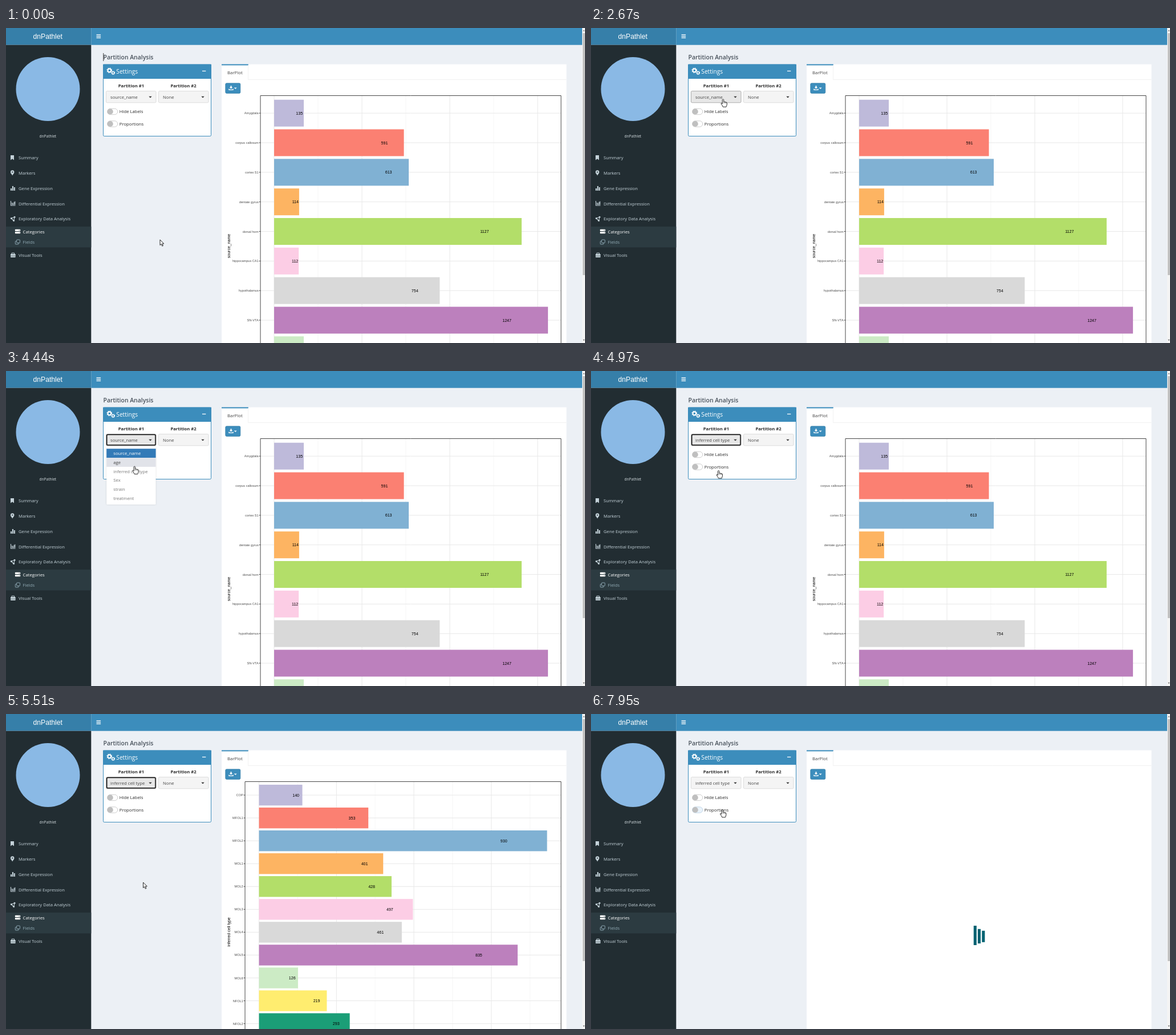
Recreate the animation shown at these times as an HTML page with a canvas. Size 1015 by 552 pixels, loop 8 s.

```html
<!DOCTYPE html>
<html lang="en">
<head>
<meta charset="utf-8">
<title>Partition Analysis</title>
<style>
html, body { margin: 0; width: 100%; height: 100%; overflow: hidden; background: #ecf0f5; }
canvas { display: block; width: 1015px; height: 552px; }
</style>
</head>
<body>
<canvas id="stage"></canvas>
<script>
const W = 1015, H = 552, LOOP = 8000;
const canvas = document.getElementById('stage');
const ctx = canvas.getContext('2d');
const dpr = window.devicePixelRatio || 1;
canvas.width = W * dpr;
canvas.height = H * dpr;

const UI = '"Open Sans", "Noto Sans", sans-serif';
const PLOT = '"Liberation Sans", Arial, sans-serif';
const BLUE = '#3c8dbc', NAV = '#c4d2d9', APP = 'dnPathlet';
const FILLS = ['#bebada', '#fb8072', '#80b1d3', '#fdb462', '#b3de69', '#fccde5',
  '#d9d9d9', '#bc80bd', '#ccebc5', '#ffed6f', '#1b9e77'];
const FIELDS = ['source_name', 'age', 'inferred cell type', 'Sex', 'strain', 'treatment'];

const regionChart = {
  title: 'source_name', left: 446, zero: 470, scale: 0.385, grid: 200,
  top: 149.2, step: 51.83, bar: 47,
  names: ['Amygdala', 'corpus callosum', 'cortex S1', 'dentate gyrus', 'dorsal horn',
    'hippocampus CA1', 'hypothalamus', 'SN-VTA', 'zona incerta'],
  values: [135, 591, 613, 114, 1127, 112, 754, 1247, 135]
};
const typeChart = {
  title: 'inferred cell type', left: 419, zero: 443.5, scale: 0.543, grid: 125,
  top: 142.1, step: 40.05, bar: 36.4,
  names: ['COP', 'MFOL1', 'MFOL2', 'MOL1', 'MOL2', 'MOL3', 'MOL4', 'MOL5', 'MOL6', 'NFOL1', 'NFOL2'],
  values: [140, 353, 930, 401, 428, 497, 461, 835, 126, 219, 293]
};

// Pointer stops: time, x, y
const STOPS = [[0, 270, 371], [1140, 270, 371], [1980, 238, 156], [2060, 237, 153],
  [2670, 231.5, 124.3], [3800, 231.5, 124.3], [4440, 225.3, 166.7], [4640, 223.6, 174],
  [5150, 223.6, 174], [5510, 240.5, 295], [5570, 241, 296], [6300, 241, 296],
  [6700, 256, 232], [7100, 230.8, 164], [7350, 230.8, 164], [7490, 230, 167]];

function rect(x, y, w, h, fill) {
  ctx.fillStyle = fill;
  ctx.fillRect(x, y, w, h);
}
function round(x, y, w, h, r, fill, stroke, width = 1) {
  ctx.beginPath();
  ctx.roundRect(x, y, w, h, r);
  if (fill) { ctx.fillStyle = fill; ctx.fill(); }
  if (stroke) { ctx.strokeStyle = stroke; ctx.lineWidth = width; ctx.stroke(); }
}
function disc(x, y, r, fill) {
  ctx.beginPath();
  ctx.arc(x, y, r, 0, 7);
  ctx.fillStyle = fill;
  ctx.fill();
}
function line(points, color, width = 1) {
  ctx.beginPath();
  points.forEach(([x, y]) => ctx.lineTo(x, y));
  ctx.strokeStyle = color;
  ctx.lineWidth = width;
  ctx.stroke();
}
function poly(points, fill) {
  ctx.beginPath();
  points.forEach(([x, y]) => ctx.lineTo(x, y));
  ctx.fillStyle = fill;
  ctx.fill();
}
function text(s, x, y, size, color, { align = 'left', weight = 400, font = UI } = {}) {
  ctx.font = `${weight} ${size}px ${font}`;
  ctx.textAlign = align;
  ctx.fillStyle = color;
  ctx.fillText(s, x, y);
}
function caretDown(x, y, color, r = 2.7) {
  poly([[x - r, y], [x + r, y], [x, y + r]], color);
}
function gear(x, y, r) {
  ctx.beginPath();
  ctx.arc(x, y, r, 0, 7);
  ctx.strokeStyle = '#fff';
  ctx.lineWidth = r * 0.65;
  ctx.stroke();
  ctx.beginPath();
  ctx.arc(x, y, r * 1.4, 0, Math.PI * 2);
  ctx.setLineDash([r * 0.55, r * 0.55]);
  ctx.stroke();
  ctx.setLineDash([]);
}

function drawHeader() {
  rect(149.3, 0, 860.7, 29.7, BLUE);
  rect(0, 0, 149.3, 29.7, '#367fa9');
  text(APP, 73.2, 18.7, 12.2, '#fff', { align: 'center', font: PLOT });
  for (let i = 0; i < 3; i++) rect(158.5, 11.2 + i * 2.7, 7.6, 1.3, '#fff');
}

function drawIcons() {
  poly([[8, 223], [14, 223], [14, 231.5], [11, 229.3], [8, 231.5]], NAV);
  disc(11.2, 252.5, 3.2, NAV);
  poly([[8.4, 254], [14, 254], [11.2, 258.6]], NAV);
  disc(11.2, 252.5, 1.1, '#222d32');
  [[8, 4], [10.9, 8], [13.8, 6]].forEach(([x, h]) => rect(x, 285 - h, 2.1, h, NAV));
  line([[8.5, 303], [8.5, 311], [16.5, 311]], NAV, 1.1);
  [4, 2.5, 5, 6].forEach((h, i) => rect(10 + i * 1.7, 309.8 - h, 1.2, h, NAV));
  line([[9.3, 333.5], [15, 331.3], [13.6, 338], [9.3, 333.5]], NAV, 1.1);
  [[9.3, 333.5], [15, 331.3], [13.6, 337.5]].forEach(([x, y]) => disc(x, y, 1.5, NAV));
  round(15.8, 352.8, 9.4, 3.3, 1, '#fff');
  round(15.8, 357, 9.4, 3.3, 1, '#fff');
  disc(23.2, 354.4, 0.6, '#2c3b41');
  disc(23.2, 358.6, 0.6, '#2c3b41');
  round(16.3, 373.5, 5.8, 5.5, 0.7, null, '#8aa4af');
  round(18.6, 371, 5.8, 5.5, 0.7, '#2c3b41', '#8aa4af');
  round(10, 394.3, 4.6, 3, 0.8, null, NAV, 1.1);
  round(8, 396, 8.7, 6, 0.9, NAV);
  rect(8, 399, 8.7, 0.6, '#222d32');
}

function drawSidebar() {
  rect(0, 29.7, 149.3, H, '#222d32');
  disc(73.5, 107, 56, '#8ab9e5');
  text(APP, 73.3, 192, 6.6, '#d5dde1', { align: 'center' });
  rect(0, 348, 149.3, 36.5, '#2c3b41');
  const items = [['Summary', 229.8], ['Markers', 256.7], ['Gene Expression', 283.6],
    ['Differential Expression', 310.5], ['Exploratory Data Analysis', 337.3], ['Visual Tools', 400.8]];
  items.forEach(([s, y]) => text(s, 22, y, 7.7, NAV));
  text('Categories', 29.6, 359.9, 7.7, '#fff');
  text('Fields', 29.6, 378.3, 7.7, '#93acb6');
  drawIcons();
}

function drawScrollbar() {
  rect(1010, 0, 5, H, '#f4f4f4');
  rect(1011, 9, 4, 424, '#c1c1c1');
  poly([[1011.3, 5.5], [1014.7, 5.5], [1013, 3.2]], '#777');
  poly([[1011.3, 545.8], [1014.7, 545.8], [1013, 548.2]], '#777');
}

function drawSelect(x, label, hover, focus) {
  const active = hover || focus;
  round(x, 110.5, 87.5, 20.3, 1.8, active ? '#e7e7e7' : '#f4f4f4', active ? '#adadad' : '#ddd');
  if (focus) round(x + 1.2, 111.6, 85.3, 18.2, 1.8, null, '#101010', 1.5);
  text(label, x + 7.5, 123.7, 7.7, '#444');
  caretDown(x + 77.5, 119.8, '#333');
}

function drawToggle(label, y, tint) {
  round(177.5, y - 5.2, 18.2, 10.4, 5.2, tint ? '#eaf3fb' : '#fff', tint ? '#bcd3e6' : '#c8c8c8', 0.9);
  disc(182.7, y, 5.1, '#bfbfbf');
  text(label, 198.8, y + 2.8, 7.7, '#2b2b2b');
}

function drawSettings(t) {
  text('Partition Analysis', 170.5, 55, 10.45, '#48515b', { weight: 600 });
  const caret = t < 560 || (t >= 1040 && t < 1560) || (t >= 2080 && t < 2610) || (t >= 3120 && t < 3320);
  if (caret) rect(170.4, 44, 0.9, 14, '#222');

  round(170.5, 64, 189, 125.5, 1.8, '#fff', BLUE);
  rect(170, 63.6, 190, 25.4, BLUE);
  gear(181.3, 74.3, 2.8);
  gear(187.8, 78.6, 2);
  text('Settings', 193.3, 80, 10.2, '#fff');
  rect(344, 74.8, 6.3, 1.3, '#fff');
  const head = { align: 'center', weight: 700 };
  text('Partition #1', 219.4, 104, 7.65, '#2b2b2b', head);
  text('Partition #2', 311, 104, 7.65, '#2b2b2b', head);

  const hover = t >= 2400 && t < 4970;
  const focus = t >= 3320 && t < 7800;
  drawSelect(175.5, t < 4970 ? FIELDS[0] : FIELDS[2], hover, focus);
  drawSelect(267.5, 'None', false, false);
  drawToggle('Hide Labels', 146.5, false);
  drawToggle('Proportions', 168, t >= 7950);
}

function drawMenu(pointerY) {
  ctx.save();
  ctx.shadowColor = 'rgba(0,0,0,.14)';
  ctx.shadowBlur = 3;
  round(176.2, 133, 86.4, 101, 1.5, '#fff');
  ctx.restore();
  const row = 15.85, top = 136.2;
  const over = Math.floor((pointerY - top) / row);
  FIELDS.forEach((s, i) => {
    const y = top + i * row;
    if (i === 0) rect(176.2, y, 86.4, row, '#337ab7');
    else if (i === over) rect(176.2, y, 86.4, row, '#e1e3e9');
    text(s, 188.3, y + 10.6, 7.7, i === 0 ? '#fff' : i === over ? '#444' : '#777');
  });
}

function drawTooltip() {
  round(232, 136.5, 57.5, 11.5, 0.5, '#fff', '#777', 0.7);
  text(FIELDS[0], 236.5, 144.8, 7.4, '#555');
}

function drawPlotBox() {
  rect(378, 63.6, 604.5, H, '#fff');
  rect(378, 63.4, 46.8, 2, BLUE);
  line([[424.5, 65.5], [424.5, 90.5], [982.5, 90.5]], '#f1f1f1');
  text('BarPlot', 388, 81, 7.8, '#444');
  round(384.8, 96.8, 26, 17.6, 1.8, BLUE, '#367fa9', 0.8);
  rect(393.5, 101.3, 2, 3, '#fff');
  poly([[391.7, 103.8], [397.3, 103.8], [394.5, 106.6]], '#fff');
  line([[391, 106.4], [391, 108.3], [398, 108.3], [398, 106.4]], '#fff', 1.3);
  caretDown(402.2, 104.6, '#fff', 2.5);
}

function drawChart(c) {
  const right = 973, top = 118.5;
  for (let i = 0, x; (x = c.zero + i * c.grid * c.scale) < right; i++)
    line([[x, top], [x, H]], i % 2 ? '#f3f3f3' : '#e8e8e8', i % 2 ? 0.7 : 1);
  c.names.forEach((name, i) => {
    const y = c.top + i * c.step, w = c.values[i] * c.scale;
    line([[c.left, y], [right, y]], '#e8e8e8');
    line([[c.left - 2.3, y], [c.left, y]], '#333', 0.9);
    rect(c.zero, y - c.bar / 2, w, c.bar, FILLS[i]);
    text(name, c.left - 3.3, y + 2, 5.6, '#4d4d4d', { align: 'right', font: PLOT });
    text(c.values[i], c.zero + w * 0.85, y + 2.6, 7.1, '#000', { align: 'center', font: PLOT });
  });
  line([[c.left, H], [c.left, top], [right, top], [right, H]], '#333', 0.9);
  ctx.save();
  ctx.translate(393, 382);
  ctx.rotate(-Math.PI / 2);
  text(c.title, 0, 0, 7, '#000', { align: 'center', font: PLOT });
  ctx.restore();
}

function drawSpinner() {
  [[670.8, 371, 34], [678, 376.8, 25.3], [685.3, 379.8, 20]]
    .forEach(([x, y, h]) => rect(x, y, 5.1, h, '#006272'));
}

function pointerAt(t) {
  let i = 0;
  while (i < STOPS.length - 1 && STOPS[i + 1][0] <= t) i++;
  const a = STOPS[i], b = STOPS[i + 1];
  if (!b) return [a[1], a[2]];
  const u = (t - a[0]) / (b[0] - a[0]);
  const k = u * u * (3 - 2 * u);
  return [a[1] + (b[1] - a[1]) * k, a[2] + (b[2] - a[2]) * k];
}

const ARROW = new Path2D('M0 0V9.6L2.2 7.6L3.8 11.2L5.4 10.5L3.8 7H6.8Z');
const HAND = new Path2D('M-1.2 1.2Q0-.6 1.2 1.2V5.2Q2.4 4.2 3.2 5.5Q4.4 4.7 5.2 6Q6.6 5.6 6.8 7V10' +
  'Q6.3 12 5.5 14H-.2Q-1 11.5-3.2 9Q-3.9 7.4-2.8 7.4Q-2 7.4-1.2 8.6Z');

function drawPointer(t, x, y) {
  const hand = (t >= 2400 && t < 5200) || t >= 7410;
  const shape = hand ? HAND : ARROW;
  ctx.save();
  ctx.translate(x, y);
  ctx.fillStyle = '#fff';
  ctx.fill(shape);
  ctx.strokeStyle = '#111';
  ctx.lineWidth = 0.9;
  ctx.lineJoin = 'round';
  ctx.stroke(shape);
  if (hand) [1.2, 3.2, 5.1].forEach(fx => line([[fx, 5.5], [fx, 7.7]], '#111', 0.6));
  ctx.restore();
}

function draw(t) {
  ctx.setTransform(dpr, 0, 0, dpr, 0, 0);
  rect(0, 0, W, H, '#ecf0f5');
  drawHeader();
  drawSidebar();
  drawScrollbar();
  drawPlotBox();
  if (t < 5090) drawChart(regionChart);
  else if (t < 5260 || t >= 7950) drawSpinner();
  else drawChart(typeChart);
  drawSettings(t);
  const [x, y] = pointerAt(t);
  if (t >= 3390 && t < 4970) drawMenu(y);
  if (t >= 3120 && t < 3320) drawTooltip();
  drawPointer(t, x, y);
}

const start = performance.now();
function tick() {
  draw((performance.now() - start) % LOOP);
  requestAnimationFrame(tick);
}
tick();
</script>
</body>
</html>
```
